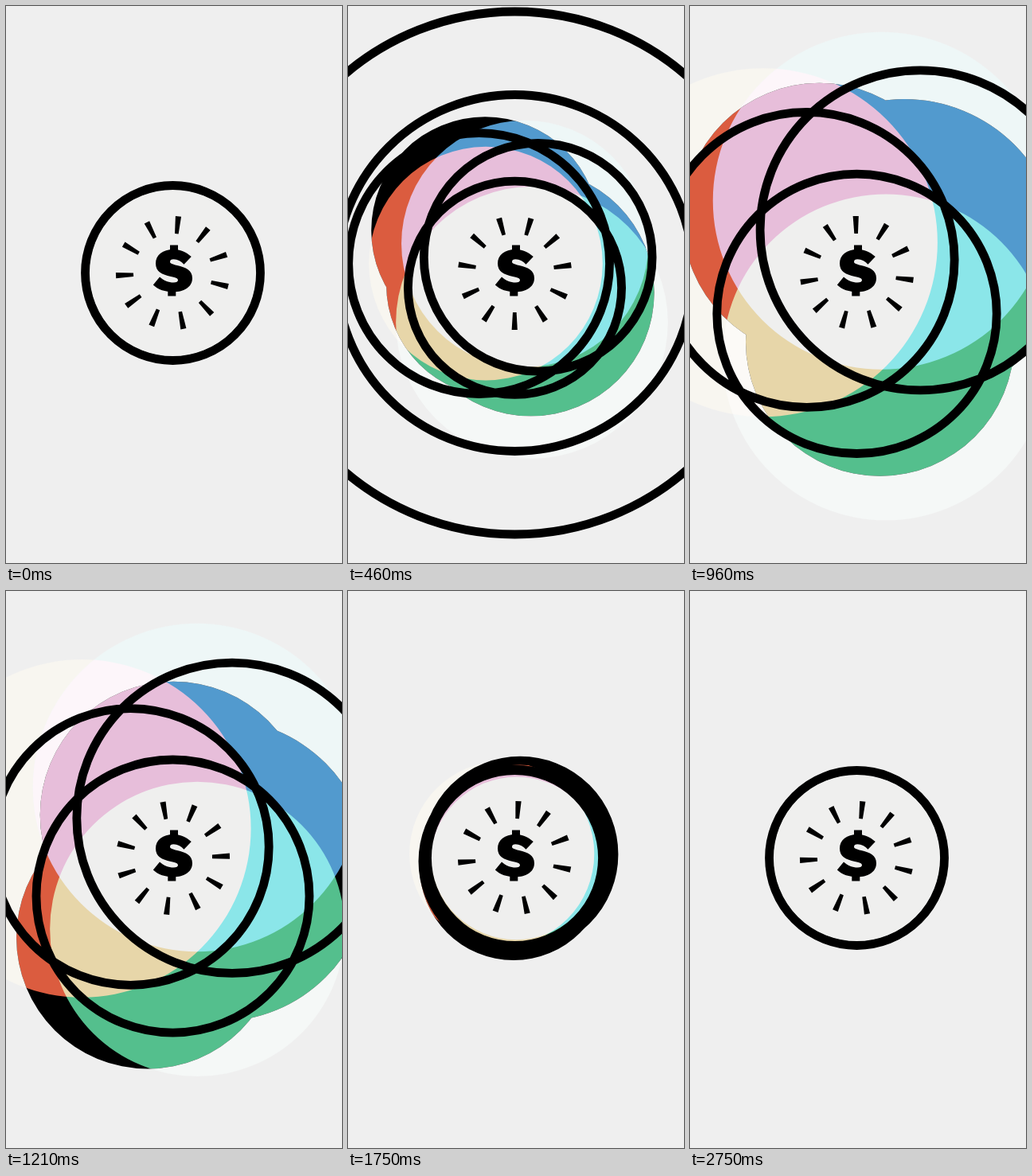
Animation of 422 by 700 pixels, one loop 2790 ms. Source, as an HTML page with a canvas:

```html
<!DOCTYPE html>
<html lang="en">
<head>
<meta charset="utf-8">
<title>Coin pulse</title>
<style>
  html, body { margin: 0; width: 100%; height: 100%; overflow: hidden; background: #efefef; }
  canvas { display: block; width: 422px; height: 700px; }
</style>
</head>
<body>
<canvas id="stage" width="422" height="700"></canvas>
<script>
const ctx = document.getElementById('stage').getContext('2d');
const LOOP = 2790, FPS = 24, LAST = 66;
const CX = 209.5, CY = 335.5, TAU = Math.PI * 2, DEG = TAU / 360;
const COIN = 110, LINE = 10.8;

// Every circle leaves the coin along an angle by `reach`, grows by `grow` and comes back.
// `keys`: start, fully out, turn back, home again (in steps of 1/24 s).
const lights = [
  { color: '#db5c3f', pale: '#f8f6f0', angle: 198, reach: 124, grow: 114, keys: [3.6, 23.6, 26.9, 46.6] },
  { color: '#529ace', pale: '#eef7f7', angle: -71, reach: 96, grow: 107, keys: [2.8, 21.6, 27.4, 44.4] },
  { color: '#54bf8d', pale: '#f5f8f7', angle: 71, reach: 112, grow: 100, keys: [1.6, 18.4, 23.5, 45.5] }
];
const paleOverlaps = [[0, 1, '#fdf6fa'], [0, 2, '#fcfaf7'], [1, 2, '#f7fbfb']];

const rings = [
  { angle: 194.8, reach: 65, grow: 75.5, keys: [0, 17, 24.7, 42] },
  { angle: -34, reach: 96, grow: 91, keys: [3, 22.5, 26, 45.5] },
  { angle: 90, reach: 51.3, grow: 65.7, keys: [3, 22.5, 26, 45.5] }
];

// The black discs also sway around the coin while their reach drifts.
const SHADOW_KEYS = [3, 19, 26, 45];
const shadows = [
  { angle: -125, reach: 94, drift: -4, grow: 57, swayPeak: 17 },
  { angle: 15, reach: 64, drift: 0, grow: 81, swayPeak: 23 },
  { angle: 107.5, reach: 81, drift: 3.5, grow: 54, swayPeak: 23 }
];

const dollar = new Path2D(
  'M232.8 315C226 309 219 306 210 306C197 306 188 313 188 323.5C188 334 196 337.5 207 340' +
  'C214 341.5 216 342.5 216 344.5C216 346.5 214 347.5 210.5 347.5C204 347.5 198 345 193 340.5' +
  'L184.8 350.5C191 356.5 200 359.3 210 359.3C224 359.3 234 353 234 342C234 332 226 328.5 215 326' +
  'C208 324.3 206 323.5 206 321.5C206 319.5 207.5 318.3 210.5 318.3C215.5 318.3 220 320.5 223.5 324.8Z');
const ray = new Path2D('M-3.6 -71.5H3.6L2.3 -49.5H-2.3Z');

function smooth(from, to, f) {
  const u = Math.min(1, Math.max(0, (f - from) / (to - from)));
  return u * u * (3 - 2 * u);
}

const pulse = ([start, out, back, home], f) => smooth(start, out, f) - smooth(back, home, f);

// Ease with flat ends, like cubic-bezier(x1, 0, x2, 1).
function bezierEase(x1, x2, x) {
  let low = 0, high = 1;
  for (let i = 0; i < 24; i++) {
    const u = (low + high) / 2, v = 1 - u;
    if (3 * u * v * v * x1 + 3 * u * u * v * x2 + u * u * u < x) low = u;
    else high = u;
  }
  return smooth(0, 1, low);
}

const polar = (angle, distance, r) =>
  [CX + Math.cos(angle * DEG) * distance, CY + Math.sin(angle * DEG) * distance, r];

const ringAt = (s, f) =>
  polar(s.angle, s.reach * pulse(s.keys, f), COIN + s.grow * pulse(s.keys, f));

// A light grows slightly ahead of its movement.
const lightAt = (s, f) =>
  polar(s.angle, s.reach * pulse(s.keys, f), 105 + s.grow * pulse(s.keys, f + 0.8));

function shadowAt(s, f) {
  const amount = pulse(SHADOW_KEYS, f);
  const sway = 36 * Math.cos((f - s.swayPeak) * Math.PI / 12);
  return polar(s.angle - sway, (s.reach + s.drift * (f - 20)) * amount, 114.5 + s.grow * amount);
}

function circles(list) {
  const shape = new Path2D();
  for (const [x, y, r] of list) {
    shape.moveTo(x + r, y);
    shape.arc(x, y, r, 0, TAU);
  }
  return shape;
}

function fill(shape, color) {
  ctx.fillStyle = color;
  ctx.fill(shape);
}

function drawLights(f) {
  const discs = lights.map(light => circles([lightAt(light, f)]));
  discs.forEach((disc, i) => fill(disc, lights[i].pale));
  for (const [a, b, color] of paleOverlaps) {
    ctx.save();
    ctx.clip(discs[a]);
    fill(discs[b], color);
    ctx.restore();
  }
  // Over the black discs the three lights add up to the page colour.
  const dark = circles(shadows.map(s => shadowAt(s, f)));
  fill(dark, '#000');
  ctx.save();
  ctx.clip(dark);
  ctx.globalCompositeOperation = 'screen';
  discs.forEach((disc, i) => fill(disc, lights[i].color));
  ctx.restore();
}

function drawRings(f) {
  const list = rings.map(s => ringAt(s, f));
  // Two waves run outwards, one after the other.
  for (let i = 0; i < 2; i++) {
    const age = f - (5.5 * i - 0.5);
    if (f > 0 && age > 0 && age < 18) list.push([CX, CY, COIN + 19 * age]);
  }
  ctx.strokeStyle = '#000';
  ctx.lineWidth = LINE;
  ctx.stroke(circles(list));
}

function drawRays(f) {
  const turn = 360 * bezierEase(0.13, 0.695, f / (LAST + 1));
  ctx.save();
  ctx.translate(CX, CY);
  ctx.rotate((5.6 - turn) * DEG);
  for (let i = 0; i < 11; i++) {
    fill(ray, '#000');
    ctx.rotate(TAU / 11);
  }
  ctx.restore();
}

function drawDollar() {
  fill(dollar, '#000');
  ctx.fillRect(206, 300.5, 10, 8);
  ctx.fillRect(203.3, 357, 10, 7.5);
}

function draw(ms) {
  const f = Math.min(LAST, Math.floor((ms % LOOP + 5) * FPS / 1000));
  ctx.fillStyle = '#efefef';
  ctx.fillRect(0, 0, 422, 700);
  drawLights(f);
  drawRings(f);
  drawRays(f);
  drawDollar();
}

const begin = performance.now();
function tick() {
  draw(performance.now() - begin);
  requestAnimationFrame(tick);
}
tick();
</script>
</body>
</html>
```
